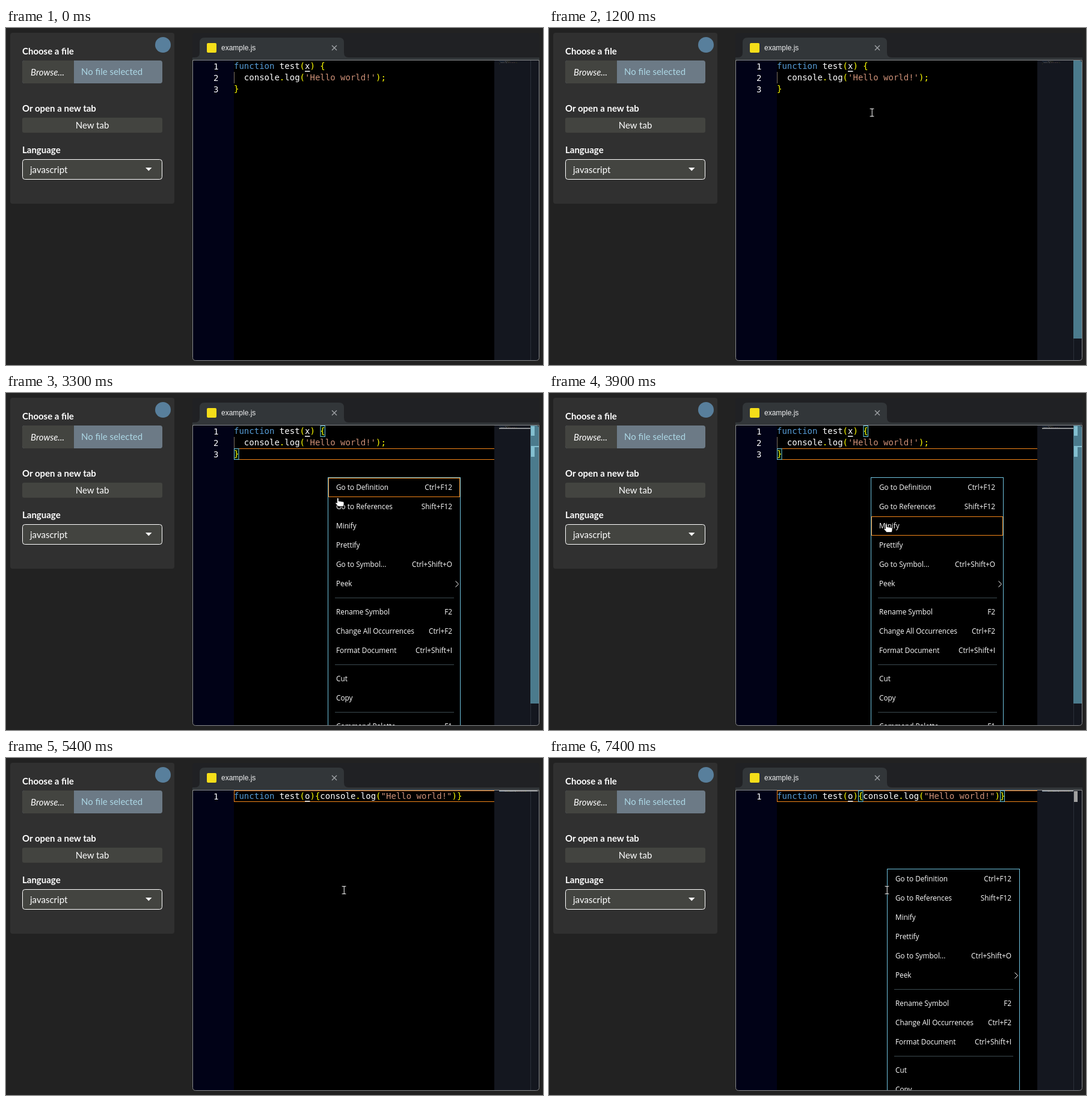
Recreate the animation shown at these times as an HTML page. Size 893x560 px, loop 8 s.

```html
<!DOCTYPE html>
<html lang="en">
<head>
<meta charset="utf-8">
<title>Code editor demo</title>
<style>
html, body { margin: 0; width: 100%; height: 100%; overflow: hidden; background: #222; }
svg { display: block; width: 893px; height: 560px; }
text { fill: #fff; white-space: pre; }
.side { font: 15px Lato, sans-serif; }
.side .label { font-weight: bold; }
.code { font: 14px "DejaVu Sans Mono", monospace; }
.keyword { fill: #569cd6; }
.string { fill: #ce9178; }
.delimiter { fill: #ff0; }
.plain tspan { fill: #fff; }
.menu { font: 11.8px "Open Sans", sans-serif; }
.menu .active { text-decoration: underline; }
.bracket { fill: #001600; stroke: #6fc3df; }
.pointer { fill: #fff; stroke: #000; stroke-width: .8; }
</style>
</head>
<body>
<svg viewBox="0 0 893 560">
  <defs>
    <clipPath id="editorClip"><rect x="311" y="54" width="575" height="498" rx="4"/></clipPath>
  </defs>
  <rect width="893" height="560" fill="#222"/>

  <g class="side">
    <rect x="7" y="8" width="273" height="284" rx="4" fill="#303030"/>
    <circle cx="261" cy="28" r="13" fill="#587f9c"/>
    <text class="label" x="27" y="43.5">Choose a file</text>
    <rect x="27" y="54" width="233" height="38" rx="4" fill="#6c7a86"/>
    <path d="M113 54H31a4 4 0 0 0-4 4v30a4 4 0 0 0 4 4h82z" fill="#434440"/>
    <text x="41" y="78.5" font-style="italic">Browse...</text>
    <text x="125" y="77.5" style="fill:#add8e6">No file selected</text>
    <text class="label" x="27" y="138.5">Or open a new tab</text>
    <rect x="27" y="149" width="233" height="25" rx="3" fill="#434440"/>
    <text x="143.5" y="166.5" text-anchor="middle">New tab</text>
    <text class="label" x="27" y="207.5">Language</text>
    <rect x="27.5" y="218.5" width="232" height="33" rx="4" fill="#434440" stroke="#fff"/>
    <text x="40" y="240.5">javascript</text>
    <path d="M232 232h10.500l-5.250 5.500z" fill="#fff"/>
  </g>

  <path d="M310 53V13a5 5 0 0 1 5-5h567a5 5 0 0 1 5 5v40z" fill="#202124"/>
  <path d="M310 53v-4h4q8 0 8-8V24q0-8 8-8h224q8 0 8 8v17q0 8 8 8h317v4z" fill="#323639"/>
  <rect x="334" y="25" width="16" height="16" rx="2" fill="#f5de19"/>
  <text x="358" y="37" style="font:12px 'Liberation Sans',sans-serif;fill:#f0f1f2">example.js</text>
  <path d="M542 29l8 8m0-8l-8 8" stroke="#a0a3a7" stroke-width="1.400"/>

  <g clip-path="url(#editorClip)">
    <rect x="311" y="54" width="576" height="500"/>
    <rect x="311" y="54" width="68" height="500" fill="#010217"/>
    <rect x="812" y="54" width="75" height="500" fill="#14171f"/>
    <path d="M872.500 54v500" stroke="#2b303a"/>
    <rect id="slider" x="872" y="54" width="14" height="462" fill="#4b7b8d"/>
    <g id="currentLine">
      <rect x="379.500" y=".5" width="440" height="18" fill="none" stroke="#f38518"/>
      <rect x="812" width="8" height="20" fill="#14171f"/>
    </g>
    <rect id="miniLine" x="820" height="1.500" fill="#b5b8ba"/>
    <g id="marksBefore">
      <path d="M873 55h6v16h-6zm0 35h6v16h-6zm0-2h13v2h-13z" fill="#83bfd0"/>
      <rect class="bracket" x="523" y="54.500" width="7.500" height="18"/>
      <rect class="bracket" x="379.500" y="92.500" width="7.500" height="18"/>
    </g>
    <g id="marksAfter">
      <rect x="873" y="55" width="6" height="18" fill="#a0a0a0"/>
      <rect class="bracket" x="514.500" y="54.500" width="7.500" height="18"/>
      <rect class="bracket" x="750.500" y="54.500" width="7" height="18"/>
    </g>
    <path id="guide" d="M379.500 73v19" stroke="#7d7060"/>
    <g id="before"></g>
    <g id="after"></g>
    <path id="underline" d="M497 72h8.500" stroke="#fff" stroke-width="1.500"/>
    <rect id="caret" x="379" y="54" width="2" height="19" fill="#fff"/>
    <g id="menu" class="menu"></g>
  </g>
  <path d="M310.500 53.500h576v494q0 5-5 5h-566q-5 0-5-5z" fill="none" stroke="#85878a"/>

  <g id="pointer" class="pointer">
    <path id="arrow" d="M0 0v14l3.300-3 2.200 5 2.300-1-2.200-4.800H10z"/>
    <path id="beam" d="M-3-6.500h2.500l.5.500.500-.5H3.500v1.500H1v11h2.500v1.500h-7v-1.500H-.5v-11H-3.500v-1.500z" stroke-width=".5"/>
    <path id="hand" d="M-2.500-1q1.300-1.500 2.600 0V3.500l7.400 1q1.500.5 1.500 2V9L8 12.500H-.5L-5 7.500q-.5-2 1.500-1.500l1 1z"/>
  </g>
</svg>
<script>
const LOOP = 8000, STEP = 100, LINE = 19, ROW = 32, CODE_X = 379;
const $ = id => document.getElementById(id);

const beforeLines = ["function test(x) {", "  console.log('Hello world!');", "}"];
const afterLines = ['function test(o){console.log("Hello world!")}'];

const highlight = line => line.replace(/(function)|("[^"]*"|'[^']*')|([^\w\s])/g, (token, keyword, string) =>
  `<tspan class="${keyword ? "keyword" : string ? "string" : "delimiter"}">${token}</tspan>`);

// Source lines, their numbers and a reduced copy in the minimap.
function buildCode(id, lines) {
  const text = lines.map((line, i) => `<text y="${14.3 + i * LINE}">${highlight(line)}</text>`).join("");
  const numbers = lines.map((_, i) =>
    `<text class="code" x="353.500" y="${69 + i * LINE}" text-anchor="end">${i + 1}</text>`).join("");
  $(id).innerHTML = `${numbers}<g class="code" transform="translate(${CODE_X} 54)">${text}</g>
    <g class="code" transform="translate(820 54) scale(.119)" opacity=".7">${text}</g>`;
}
buildCode("before", beforeLines);
buildCode("after", afterLines);

const menuItems = [
  ["Go to Definition", "Ctrl+F12"], ["Go to References", "Shift+F12"], ["Minify"], ["Prettify"],
  ["Go to Symbol...", "Ctrl+Shift+O"], ["Peek"], null,
  ["Rename Symbol", "F2"], ["Change All Occurrences", "Ctrl+F2"], ["Format Document", "Ctrl+Shift+I"], null,
  ["Cut"], ["Copy"], null, ["Command Palette", "F1"]
];

function buildMenu() {
  let y = 0;
  const rows = menuItems.map(item => {
    if (!item) {
      y += 15;
      return `<path d="M12 ${y - 6.5}h198" stroke="#3b4a50"/>`;
    }
    const [name, keys = ""] = item;
    const row = `<g class="row"><text x="14" y="${y + 20.5}">${name}</text>
      <text x="207" y="${y + 20.5}" text-anchor="end">${keys}</text></g>`;
    const chevron = name === "Peek" ? `<path d="M212.500 ${y + 12.5}l5 5-5 5" fill="none" stroke="#fff"/>` : "";
    y += ROW;
    return row + chevron;
  }).join("");
  $("menu").innerHTML = `<rect x=".5" y=".5" width="220" height="460" stroke="#6fc3df"/>${rows}
    <rect id="selection" x="1.500" width="218" height="31" fill="none" stroke="#f38518"/>`;
}
buildMenu();
const menuRows = document.querySelectorAll(".row");

const pointerPath = [[900, 283, 37], [1200, 537, 140], [3000, 537, 140], [3300, 553, 176], [3900, 562, 219], [LOOP, 562, 219]];

function pointerAt(t) {
  const i = Math.max(1, pointerPath.findIndex(point => point[0] >= t));
  const [t0, x0, y0] = pointerPath[i - 1], [t1, x1, y1] = pointerPath[i];
  const p = Math.max(0, (t - t0) / (t1 - t0));
  return { x: x0 + (x1 - x0) * p, y: y0 + (y1 - y0) * p };
}

const show = (id, visible) => $(id).setAttribute("display", visible ? "inline" : "none");
const move = (id, x, y) => $(id).setAttribute("transform", `translate(${x} ${y})`);
const between = (t, start, end) => t >= start && t < end;

function render(t) {
  const minified = t >= 4600, coloured = t >= 4800;
  const firstMenu = between(t, 2200, 4600), secondMenu = t >= 7100;

  show("before", !minified);
  show("after", minified);
  $("after").setAttribute("class", coloured ? "" : "plain");
  show("guide", !minified);
  show("underline", !minified || t >= 5400);
  show("marksBefore", firstMenu);
  show("marksAfter", secondMenu);
  show("caret", minified && !secondMenu && Math.floor((t - 4600) / 500) % 2 === 0);

  show("slider", between(t, 1000, 4600));
  $("slider").setAttribute("opacity", Math.min(1, (t - 900) / 200));
  show("currentLine", t >= 2200);
  move("currentLine", 0, minified ? 54 : 92);
  show("miniLine", t >= 2200);
  $("miniLine").setAttribute("y", minified ? 54 : 58);
  $("miniLine").setAttribute("width", minified && !secondMenu ? 66 : 52);

  show("menu", firstMenu || secondMenu);
  move("menu", secondMenu ? 562 : 535, secondMenu ? 184 : 140);
  $("menu").setAttribute("opacity", between(t, 2200, 2400) || between(t, 7100, 7400) ? 0.45 : 1);

  // The selected row trails the pointer by one step.
  const row = firstMenu ? Math.floor((pointerAt(t - STEP).y - 141) / ROW) : -1;
  show("selection", row >= 0);
  $("selection").setAttribute("y", 1.5 + row * ROW);
  menuRows.forEach((el, i) => el.classList.toggle("active", i === row));

  const { x, y } = pointerAt(t);
  const hand = between(t, 3100, 4800), arrow = x < CODE_X;
  show("pointer", t >= 900);
  move("pointer", x, y);
  show("hand", hand);
  show("arrow", arrow);
  show("beam", !hand && !arrow);
}

const start = performance.now();
function frame(now) {
  const t = Math.max(0, now - start) % LOOP;
  render(Math.floor(t / STEP) * STEP);
  requestAnimationFrame(frame);
}
render(0);
requestAnimationFrame(frame);
</script>
</body>
</html>
```
